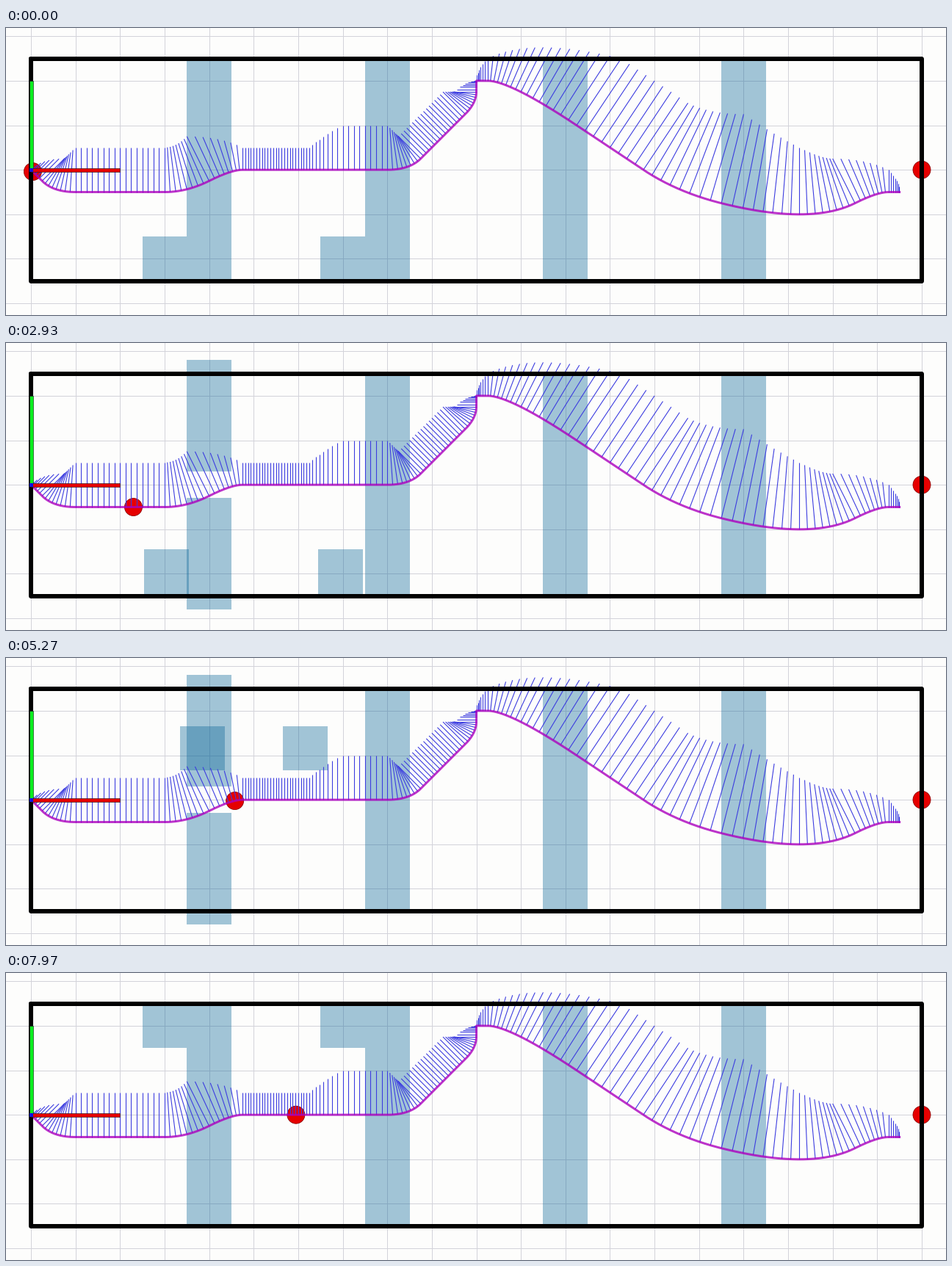
Write a matplotlib script that moves like this. It is 1280x391 px and loops after 8000 ms.

```python
import numpy as np
import matplotlib.pyplot as plt
from matplotlib.animation import FuncAnimation
from matplotlib.collections import LineCollection
from matplotlib.patches import Circle, Rectangle

WIDTH, HEIGHT, DPI = 1280, 391, 100
FRAMES, LOOP_MS = 240, 8000
UNIT, X0, Y0 = 60.65, 34, 193.2      # pixels per unit, origin on the stage

# Velocity at each whole second; it changes linearly in between
VEL = np.array(
    [(0, 0), (.5, -.5)] + 3 * [(1, 0)] + [(1, .5)] + 4 * [(.5, 0)]
    + 2 * [(1, 0)] + 3 * [(.5, .5)] + [(0, .5), (0, 0), (.5, 0), (1, -.5)]
    + 2 * [(1.5, -1)] + [(2, -.5), (1.5, 0), (1, .5), (.5, 0), (0, 0)])
POS = np.vstack([(0, 0), np.cumsum((VEL[1:] + VEL[:-1]) / 2, axis=0)])
END = len(VEL) - 1


def px(n):
    """Line width in points for n pixels."""
    return n * 72 / DPI


def stage(p):
    p = np.asarray(p, float)
    return np.stack([X0 + UNIT * p[..., 0], Y0 - UNIT * p[..., 1]], axis=-1)


def trajectory(t):
    """Position and velocity at times t, in units and seconds."""
    t = np.atleast_1d(t)
    k = np.clip(t.astype(int), 0, END - 1)
    w = (t - k)[:, None]
    acc = VEL[k + 1] - VEL[k]
    return POS[k] + VEL[k] * w + acc * w**2 / 2, VEL[k] + acc * w


fig = plt.figure(figsize=((WIDTH + 1e-6) / DPI, (HEIGHT + 1e-6) / DPI), dpi=DPI,
                 facecolor="#fdfdfc")
ax = fig.add_axes([0, 0, 1, 1])
ax.set_xlim(0, WIDTH)
ax.set_ylim(HEIGHT, 0)
ax.axis("off")


def block(x, y, w, h):
    """Translucent obstacle, given by its top left corner in units."""
    return ax.add_patch(Rectangle(stage((x, y)), w * UNIT, h * UNIT, lw=0, zorder=3,
                                  fc=(.043, .404, .6), alpha=.38))


def ball(x, y):
    return ax.add_patch(Circle(stage((x, y)), 12, fc="#e60000", ec="#8c0000",
                               lw=px(.8), zorder=2))


def bar(left, top, w, h, color):
    ax.add_patch(Rectangle((left, top), w, h, fc=color, ec="#202020",
                           lw=px(.6), zorder=8))


# Grid
for k in range(-1, 22):
    ax.axvline(X0 + k * UNIT, color="#d3d3da", lw=px(1), zorder=0)
for k in range(-3, 4):
    ax.axhline(Y0 + k * UNIT, color="#d3d3da", lw=px(1), zorder=0)

# Path with a velocity comb along its normals
pos, vel = trajectory(np.arange(0, END, .125))
tips = pos + np.stack([-vel[:, 1], vel[:, 0]], axis=1)
ax.add_collection(LineCollection(np.stack([stage(pos), stage(tips)], axis=1),
                                 colors="#3c3ce0", linewidths=px(1.1), zorder=4))
curve = trajectory(np.linspace(0, END, 1200))[0]
ax.plot(*stage(curve).T, color="#ac00be", alpha=.8, lw=px(3), zorder=5)

# Walls: the first is a sliding double door
for x in (7.5, 11.5, 15.5):
    block(x, 2.5, 1, 5)
upper, lower = block(3.5, 2.5, 1, 2.5), block(3.5, 0, 1, 2.5)
left_box, right_box = block(2.5, -1.5, 1, 1), block(6.5, -1.5, 1, 1)

# Room outline, goal and axes
corners = [(0, 2.5), (20, 2.5), (20, -2.5), (0, -2.5), (0, 2.5)]
ax.plot(*stage(corners).T, color="black", lw=px(6), zorder=7,
        solid_joinstyle="round", solid_capstyle="round")
ball(20, 0)
runner = ball(0, 0)
bar(X0 - 2.5, Y0 - 2 * UNIT, 5, 2 * UNIT, "#0aee1e")
bar(X0, Y0 - 2.5, 2 * UNIT, 5, "#e60000")
ax.add_patch(Rectangle((X0 - 2.5, Y0 - 2.5), 5, 5, fc="#1010e0", lw=0, zorder=9))


def update(frame):
    # The simulation advances a tenth of a second every third frame
    clock = (frame + 13) // 3 / 10
    runner.center = stage(trajectory(clock)[0][0])

    gap = max(0, 1.5 - abs(clock - 4.5))
    upper.set_y(Y0 - (2.5 + gap) * UNIT)
    lower.set_y(Y0 + gap * UNIT)

    # Boxes speed up towards the middle height, then slow down again
    s = np.clip(clock - 5, -2, 2)
    y = s * (2 - abs(s) / 2)
    for box, x in ((left_box, 5 - abs(y)), (right_box, 5 + abs(y))):
        box.set_xy(stage((x - .5, y + .5)))
    return runner, upper, lower, left_box, right_box


anim = FuncAnimation(fig, update, frames=FRAMES, interval=LOOP_MS / FRAMES,
                     repeat=True, repeat_delay=0, blit=False)
plt.show()
```
